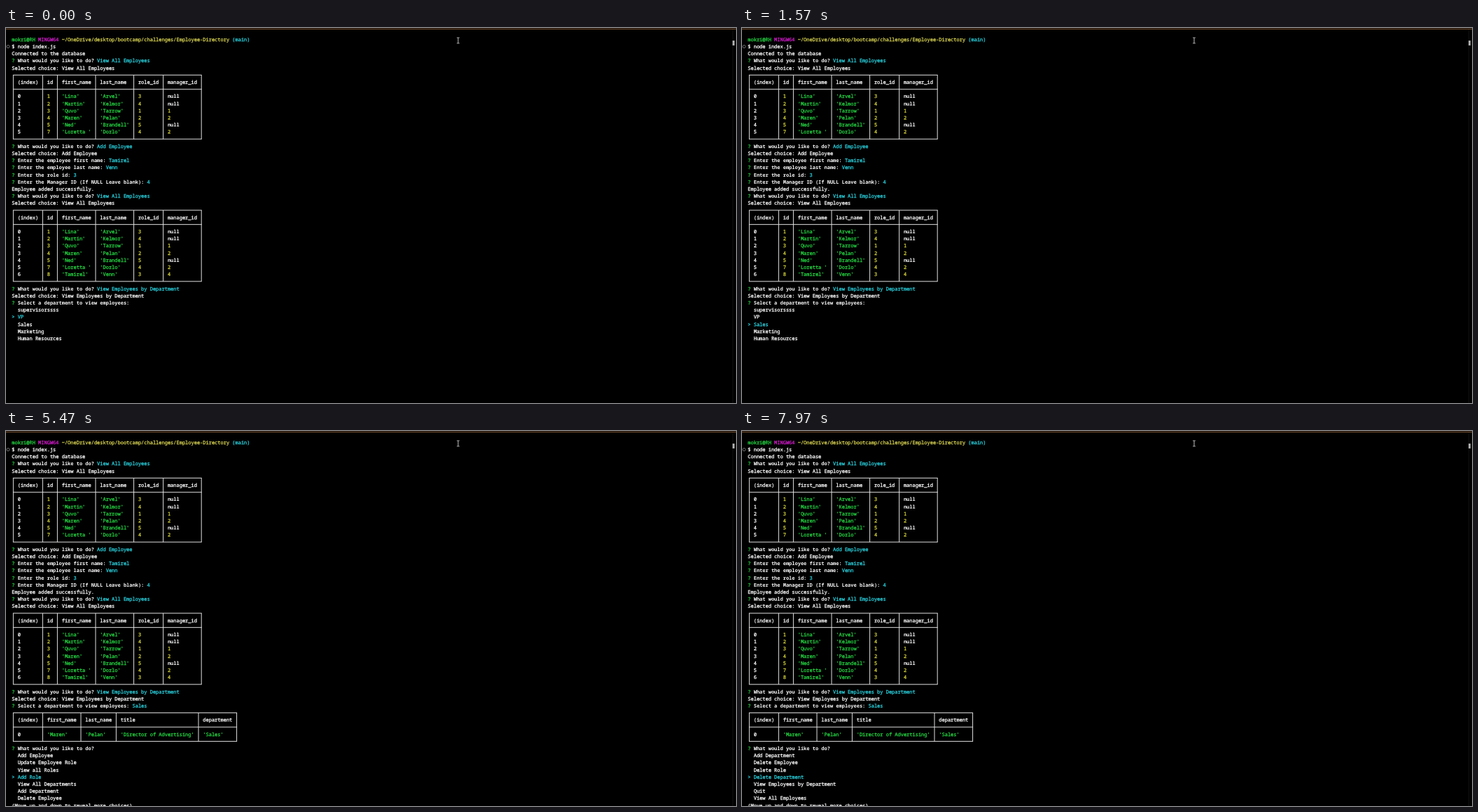
Recreate the animation shown at these times as an HTML page with a canvas. Size 1043x537 px, loop 8000 ms.

```html
<!DOCTYPE html>
<html lang="en">
<head>
<meta charset="utf-8">
<title>Employee directory terminal</title>
<style>
  html, body { margin: 0; width: 100%; height: 100%; overflow: hidden; background: #000; }
  canvas { display: block; }
</style>
</head>
<body>
<canvas id="stage" width="1043" height="537"></canvas>
<script>
const ctx = document.getElementById('stage').getContext('2d');
const LOOP = 8000;
const CELL = 4.2, LEFT = 8.3, LINE = 10.19, FIRST = 16.4;
const WHITE = '#fafafa', GREEN = '#24d442', CYAN = '#29d0dc',
      MAGENTA = '#cc1ac5', PATH = '#d8d352', YELLOW = '#d2d138';

const colX = col => LEFT + col * CELL;
const rowY = row => FIRST + row * LINE;

// Each entry: [time in ms, selected index]
const departmentSteps = [[0, 1], [270, 2], [600, 3], [1270, 2]];
const actionSteps = [[3600, 0], [4400, 1], [4800, 2], [5050, 3], [5300, 4],
                     [5550, 5], [5800, 6], [6050, 7], [6300, 8], [7250, 9]];
const RESULT_TIME = actionSteps[0][0];

const departments = ['supervisorssss', 'VP', 'Sales', 'Marketing', 'Human Resources'];
const actions = ['View All Employees', 'Add Employee', 'Update Employee Role', 'View all Roles',
  'Add Role', 'View All Departments', 'Add Department', 'Delete Employee', 'Delete Role',
  'Delete Department', 'View Employees by Department', 'Quit'];
const PAGE = 7, MIDDLE = 3;

const columns = ['(index)', 'id', 'first_name', 'last_name', 'role_id', 'manager_id'];
const employees = [
  [1, "'Lina'", "'Arvel'", 3, null],
  [2, "'Martin'", "'Kelmor'", 4, null],
  [3, "'Quvo'", "'Tarrow'", 1, 1],
  [4, "'Maren'", "'Pelan'", 2, 2],
  [5, "'Ned'", "'Brandell'", 5, null],
  [7, "'Loretta '", "'Dorlo'", 4, 2]
];
const added = [8, "'Tamirel'", "'Venn'", 3, 4];

function text(row, col, string, color = WHITE, bold = false) {
  ctx.font = `${bold ? 700 : 400} 7px "Noto Sans Mono", "DejaVu Sans Mono", monospace`;
  ctx.fillStyle = ctx.strokeStyle = color;
  ctx.fillText(string, colX(col), rowY(row) + 2.5);
  // A hairline outline gives small regular text its solid weight.
  if (!bold) {
    ctx.lineWidth = 0.3;
    ctx.strokeText(string, colX(col), rowY(row) + 2.5);
  }
}

function prompt(row, question, answer = '') {
  text(row, 0, '?', GREEN);
  text(row, 2, question, WHITE, true);
  text(row, question.length + 3, answer, CYAN);
}

function cell(row, col, value) {
  if (value === null) text(row, col, 'null', WHITE, true);
  else text(row, col, String(value), typeof value === 'number' ? YELLOW : GREEN);
}

function table(top, headers, rows) {
  const edges = [0];
  headers.forEach((header, i) => {
    const lengths = rows.map(r => i ? String(r[i - 1]).length : 1);
    edges.push(edges[i] + Math.max(header.length, ...lengths) + 3);
  });
  const bottom = top + rows.length + 3;
  const xs = edges.map(col => colX(col + 0.5));
  const ys = [top, top + 2, bottom].map(rowY);

  ctx.strokeStyle = '#e0e0e0';
  ctx.lineWidth = 1;
  ctx.beginPath();
  for (const x of xs) { ctx.moveTo(x, ys[0]); ctx.lineTo(x, ys[2]); }
  for (const y of ys) { ctx.moveTo(xs[0] - 0.5, y); ctx.lineTo(xs[xs.length - 1] + 0.5, y); }
  ctx.stroke();

  headers.forEach((header, i) => text(top + 1, edges[i] + 2, header));
  rows.forEach((values, r) => {
    text(top + 3 + r, 2, String(r));
    values.forEach((value, i) => cell(top + 3 + r, edges[i + 1] + 2, value));
  });
}

function menu(row, items, selected) {
  items.forEach((item, i) => {
    const active = i === selected;
    if (active) text(row + i, 0, '>', CYAN);
    text(row + i, 2, item, active ? CYAN : WHITE);
  });
}

function windowChrome() {
  ctx.fillStyle = '#80572f';
  ctx.fillRect(0, 1, 1043, 1);
  ctx.fillStyle = '#111';
  ctx.fillRect(1038, 2, 1, 535);
  ctx.fillStyle = '#a6a6a6';
  ctx.fillRect(1038, 18, 3, 7);

  ctx.strokeStyle = '#8c8c8c';
  ctx.lineWidth = 0.8;
  ctx.beginPath();
  ctx.arc(3, 26.6, 2, 0, Math.PI * 2);
  ctx.stroke();

  // Text pointer
  ctx.fillStyle = '#c0c0c0';
  ctx.fillRect(645.5, 14, 1, 8);
  ctx.fillRect(644, 13.5, 4, 0.8);
  ctx.fillRect(644, 21.5, 4, 0.8);
}

function history() {
  const ask = 'What would you like to do?';
  text(0, 0, 'mokri@RH', GREEN);
  text(0, 9, 'MINGW64', MAGENTA);
  text(0, 17, '~/OneDrive/desktop/bootcamp/challenges/Employee-Directory', PATH);
  text(0, 75, '(main)', CYAN);
  text(1, 0, '$ node index.js');
  text(2, 0, 'Connected to the database');
  prompt(3, ask, 'View All Employees');
  text(4, 0, 'Selected choice: View All Employees');
  table(5, columns, employees);
  prompt(15, ask, 'Add Employee');
  text(16, 0, 'Selected choice: Add Employee');
  prompt(17, 'Enter the employee first name:', 'Tamirel');
  prompt(18, 'Enter the employee last name:', 'Venn');
  prompt(19, 'Enter the role id:', '3');
  prompt(20, 'Enter the Manager ID (If NULL Leave blank):', '4');
  text(21, 0, 'Employee added successfully.');
  prompt(22, ask, 'View All Employees');
  text(23, 0, 'Selected choice: View All Employees');
  table(24, columns, [...employees, added]);
  prompt(35, ask, 'View Employees by Department');
  text(36, 0, 'Selected choice: View Employees by Department');
}

const selectedAt = (steps, time) => steps.filter(([start]) => start <= time).pop()[1];

function draw(time) {
  ctx.fillStyle = '#000';
  ctx.fillRect(0, 0, 1043, 537);
  windowChrome();
  history();

  const question = 'Select a department to view employees:';
  if (time < RESULT_TIME) {
    prompt(37, question);
    menu(38, departments, selectedAt(departmentSteps, time));
    return;
  }
  prompt(37, question, 'Sales');
  table(38, ['(index)', 'first_name', 'last_name', 'title', 'department'],
    [["'Maren'", "'Pelan'", "'Director of Advertising'", "'Sales'"]]);
  prompt(43, 'What would you like to do?');

  // The pointer stops at the middle row, after which the list scrolls around.
  const selected = selectedAt(actionSteps, time);
  const offset = Math.max(0, selected - MIDDLE);
  const page = Array.from({ length: PAGE }, (_, i) => actions[(offset + i) % actions.length]);
  menu(44, page, selected - offset);
  text(51, 0, '(Move up and down to reveal more choices)');
}

ctx.textRendering = 'geometricPrecision';
ctx.lineJoin = 'round';
const startTime = performance.now();
function tick() {
  draw((performance.now() - startTime) % LOOP);
  requestAnimationFrame(tick);
}
tick();
</script>
</body>
</html>
```
